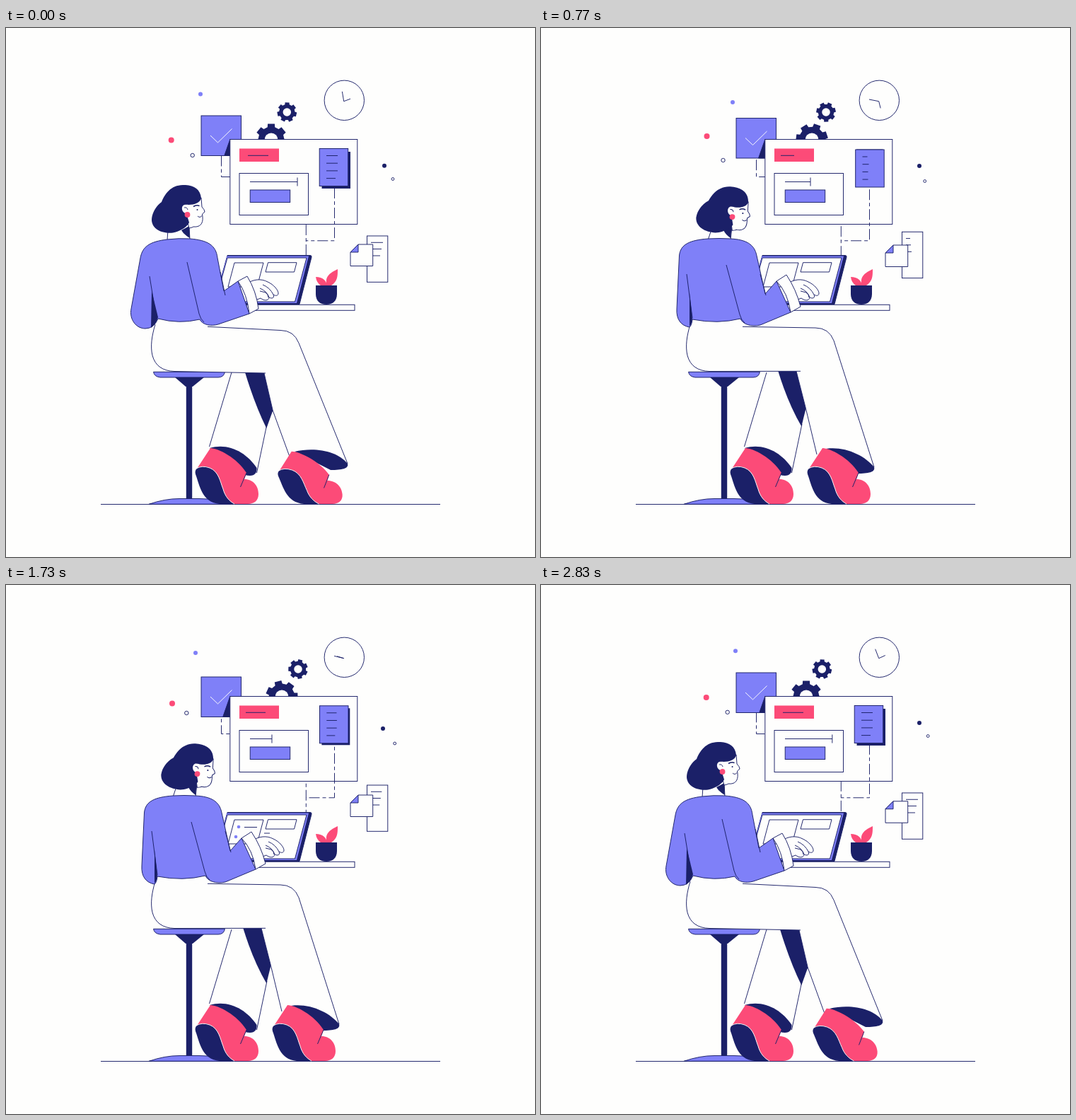
These frames come from a looping animation (748x748 px, 2860 ms). An HTML page:

```html
<!DOCTYPE html>
<html>
<head>
<meta charset="utf-8">
<style>
  html, body { margin: 0; width: 100%; height: 100%; overflow: hidden; background: #fefefd; }
  svg { display: block; width: 100vw; height: 100vh; stroke-width: .95; }
</style>
</head>
<body>
<svg id="stage" viewBox="0 0 748 748"></svg>
<script>
const LOOP = 2860;
const TIMES = [0, 370, 770, 1370, 1730, 2130];
const NAVY = '#1b2068', BLUE = '#7f80f8', PINK = '#fc4b78', WHITE = '#fefefd';
const stage = document.getElementById('stage');

// Smooth cyclic interpolation through one value per key time, without overshoot
function key(t, v) {
  const n = TIMES.length;
  const at = i => TIMES[(i + n) % n] + LOOP * Math.floor(i / n);
  const val = i => v[(i + n) % n];
  const slope = i => (val(i + 1) - val(i)) / (at(i + 1) - at(i));
  const tangent = i => {
    const a = slope(i - 1), b = slope(i);
    return a * b > 0 ? 2 * a * b / (a + b) : 0;
  };
  let i = n - 1;
  while (at(i) > t) i--;
  const d = at(i + 1) - at(i), u = (t - at(i)) / d, w = 1 - u;
  return val(i) * w * w * (1 + 2 * u) + val(i + 1) * u * u * (3 - 2 * u)
    + d * u * w * (tangent(i) * w - tangent(i + 1) * u);
}

function ramp(t, a, b) {
  const u = Math.min(1, Math.max(0, (t - a) / (b - a)));
  return u * u * (3 - 2 * u);
}

// Blends two path strings that share the same structure
function morph(a, b, u) {
  const nums = b.match(/[\d.]+/g);
  let i = 0;
  return a.replace(/[\d.]+/g, n => (+n + (nums[i++] - n) * u).toFixed(2));
}

const path = (d, fill = 'none', stroke = NAVY, extra = '') =>
  `<path d="${d}" fill="${fill}" stroke="${stroke}" ${extra}/>`;
const rect = (x, y, w, h, fill = WHITE, stroke = NAVY) =>
  `<rect x="${x}" y="${y}" width="${w}" height="${h}" fill="${fill}" stroke="${stroke}"/>`;
const circle = (x, y, r, fill = WHITE, stroke = 'none') =>
  `<circle cx="${x}" cy="${y}" r="${r}" fill="${fill}" stroke="${stroke}"/>`;
const group = (transform, body) => `<g transform="${transform}">${body}</g>`;
const hline = (x, y, w) => w > 0.3 ? `M${x} ${y}h${w}` : '';

function gear(x, y, r, turn) {
  const teeth = 7, pts = [];
  for (let i = 0; i < teeth; i++) {
    for (const [o, k] of [[-.32, .8], [-.24, 1], [.24, 1], [.32, .8]]) {
      const a = (i + o) / teeth * 2 * Math.PI + turn;
      pts.push((x + r * k * Math.sin(a)).toFixed(2) + ' ' + (y - r * k * Math.cos(a)).toFixed(2));
    }
  }
  return path('M' + pts.join('L') + 'Z', NAVY, 'none') + circle(x, y, r * .41);
}

function clock(t) {
  const hand = (deg, len) => {
    const a = deg * Math.PI / 180;
    return `M477.7 103.7L${477.7 + len * Math.sin(a)} ${103.7 - len * Math.cos(a)}`;
  };
  const turn = t / LOOP * 360;
  return circle(478.3, 102.3, 28.2, WHITE, NAVY) + path(hand(turn * 3 - 10, 14) + hand(turn + 69, 10));
}

function dots(t) {
  return circle(key(t, [275, 273, 271, 268, 268, 270]), key(t, [93.5, 100, 105, 102, 96, 91]), 3, BLUE)
    + circle(key(t, [233.7, 233.7, 234.5, 235.7, 235, 232.5]), key(t, [158.5, 153, 153, 162, 167.5, 168.5]), 4, PINK)
    + circle(key(t, [263.7, 261, 257.5, 254.7, 255.3, 258]), key(t, [180, 184, 187, 184, 181, 177.7]), 2.7, WHITE, NAVY)
    + circle(key(t, [535, 534.7, 535, 534, 533, 533]), key(t, [194.7, 193.3, 195, 201, 203, 203]), 3, NAVY)
    + circle(key(t, [547, 544, 542.7, 546.3, 549.7, 550.5]), key(t, [213.5, 213.7, 216.5, 222, 224, 222]), 1.9, WHITE, NAVY);
}

function board(t) {
  const flow = `stroke-dasharray="15 4 5 4" stroke-dashoffset="${-t / LOOP * 112}"`;
  const y = key(t, [124, 125, 127.5, 131, 130, 127.5]), low = y + 56.5;
  const tick = 1 - ramp(t, 950, 1250) + ramp(t, 1420, 1700);
  const small = key(t, [397.3, 398.3, 403, 412, 413, 408]);
  const big = key(t, [375, 378, 383, 391, 390, 383]);
  const s = key(t, [1, .65, 0, 1, .8, 0]), shift = 1.5 * (1 - s);
  const slider = key(t, [412, 378, 381, 385, 376, 369]);
  const from = key(t, [342, 341, 339, 343, 339, 338]), to = key(t, [371, 368, 358, 372, 367, 366]);
  const rows = [7, 9, 8, 8].map((w, i) =>
    hline(453 + shift, 180.5 + shift + i * 10.7, w + s * [9, 7, 8, 5][i])).join('');

  return path(`M304.5 ${low}V210.5H317`, 'none', NAVY, flow)
    + rect(276, y, 56.5, 56.5, BLUE)
    + path(`M317 157L${317 - (low - 157) * .35} ${low}H317Z`, NAVY)
    + (tick > .01 ? path(`M289 ${y + 28}l10.5 10 20-19.5`, 'none', WHITE,
        `pathLength="1" stroke-dasharray="${tick} 2"`) : '')
    + gear(small, 119, 14, (small - 397) / 14)
    + gear(big, 158, 23, (big - 375) / 23)
    + rect(316.8, 157.5, 180, 120)
    + rect(330, 170.5, 56, 18.5, PINK, 'none') + path(hline(from, 180.3, to - from))
    + rect(330, 205.5, 97.5, 59)
    + rect(345.2, 229, 56.5, 17.5, BLUE)
    + path(`M345 217.5H${slider}M${slider} 211.5v12`)
    + rect(446 + .5 * s, 171.5 + 3.5 * s, 37.5 + 3 * s, 52, NAVY, 'none')
    + rect(443.2 + shift, 170.5 + shift, 40.5, 53, BLUE) + path(rows)
    + path('M464.5 226V300.8H424M424.3 278V321', 'none', NAVY, flow);
}

function papers(t) {
  const y = key(t, [294, 292.3, 288.3, 282.7, 283, 287]);
  const top = key(t, [306, 308, 307, 300, 297, 297]);
  const s = key(t, [1, .75, 0, 1, .85, .45]);
  return rect(510.5, y, 29.3, 65.3)
    + path(hline(516, y + 9.3, 6 + 11 * s) + hline(516, y + 18.5, 7 + 8 * s) + hline(516, y + 28, 8 + 5 * s))
    + path(`M498 ${top}H518.7v30.5H487v-19.5Z`, WHITE)
    + path(`M498 ${top}v11H487Z`, BLUE);
}

function desk(t) {
  const gone = 1 - ramp(t, 2350, 2600);
  const list = ramp(t, 850, 1200) * gone, note = ramp(t, 1550, 2050) * gone;
  return rect(340, 391.3, 153, 8)
    + path('M313 321.5H430Q432.5 321.5 432 324L415 390.5H294Z', NAVY)
    + path('M312.5 322.5H428L411 389H294Z', BLUE, 'none')
    + path('M313 325H425L408.5 387H296Z', WHITE, NAVY)
    + path('M323 332H364L355 366H314ZM370.5 331.7H411L407.5 345H367Z')
    + circle(329, 342, 2.3 * list, BLUE) + circle(325, 356, 2.3 * list, BLUE)
    + path(hline(337, 342.5, 18 * list) + hline(365, 351, 27 * note))
    + path('M454 364C450 352 458 346 469 341C469 351 469 358 460 364Z'
      + 'M438 352C448 352 453 357 454 364H445Q439 360 438 352Z', PINK, 'none')
    + path('M438 364H468V376C468 386 462 391 453 391S438 386 438 376Z', NAVY, 'none');
}

const STOOL = path('M254.8 500H263.2V667H254.8Z', NAVY, 'none')
  + path('M239 494H280L264 507H254Z', NAVY, 'none')
  + path('M202 673.3Q225 665.5 245 665.5H273Q297 665.5 318 673.3Z', BLUE)
  + path('M208.5 486.3H309.5Q308 494 300 494H218Q209.5 493 208.5 486.3Z', BLUE);

const SHOE = path('M289 594C300 594 327 608 340 629L337 638C350 638 357 648 357 659C357 668 351 673 342 673H310'
    + 'L270 628V623Z', PINK, 'none')
  + path('M340 629L331.5 649')
  + path('M268 631C265 620 280 618 288 622C301 627 303 642 307 652C310 663 316 669 323 673H302'
    + 'C277 671 274 647 268 631Z', NAVY, 'none')
  + path('M269 623Q277 618 288 622C301 627 303 642 307 652C310 663 316 669 323 673', 'none', WHITE);

function legs(t) {
  const knee = key(t, [427.5, 420.5, 424, 424, 424, 422]);
  const under = key(t, [488, 482.3, 485.3, 485.3, 485.3, 484]);
  const hx = key(t, [483, 478.5, 471, 471, 471, 475.5]);
  const hy = key(t, [616, 614, 621, 621, 621, 616]);
  const bx = key(t, [401, 397, 390, 390, 390, 394]);
  const by = key(t, [606, 600, 603, 603, 603, 601]);
  const dx = key(t, [119.5, 118.5, 109, 109, 109, 113.5]);
  const tilt = key(t, [0, -5, 0, 0, 0, -2.3]);
  const lean = key(t, [.06, 0, 0, 0, 0, 0]);
  const crotch = key(t, [338, 338, 335, 335, 335, 337]);
  const swing = (bx - 390) * .36;
  const inner = `L${361 + swing} ${under}L${374.5 + swing * .7} ${under + 53}L${bx} ${by}`;
  const hip = 'M211 419C206 436 204 450 207 463C211 478 222 485 238 485.5';
  const front = `L388 ${knee}Q407 ${knee} 414 ${knee + 18}L${hx} ${hy}`;

  return path('M319 487L287.5 592M369 560L354.5 629')
    + path(`M${crotch} ${under - 1}H${361 + swing}L${374.5 + swing * .7} ${under + 53}L${368.3} ${under + 78}`
      + `Q${crotch + 14} ${under + 45} ${crotch} ${under - 1}Z`, NAVY, 'none')
    + path('M288 594C314 586 340 600 354.5 622C355 631 350 635 338 632Z', NAVY, 'none') + SHOE
    + path(`${hip}${inner}L${hx} ${hy}L414 ${knee + 18}Q407 ${knee} 388 ${knee}L285 422`, WHITE, 'none')
    + path(`${hip}L367 ${under}M${361 + swing} ${under}${inner}M285 422.3${front}`)
    + path(`M${bx + 7} ${by - 7}C${bx + 35} ${by - 14} ${hx - 14} ${hy - 18} ${hx} ${hy}`
      + `C${hx + 2} ${hy + 7} ${hx - 8} ${hy + 9} ${hx - 24} ${hy + 9}Z`, NAVY, 'none')
    + group(`translate(${dx} 0) rotate(${tilt} 285 672) matrix(1 0 ${lean} ${1 - lean} ${-673 * lean} ${673 * lean})`, SHOE);
}

function head(h) {
  const skull = path('M250 250L259 283Q264 282 265 281C274 282 279 277 278 267L277.5 263L281 260Q281 257 277 253L276 240Z', WHITE)
    + path('M276 241C275 227 264 221.5 250 222C233 222.5 225 234 220 246C213 251 206 261 206 272C207 285 221 291 236 289.5'
      + 'C248 287 256 281 259 275L255 262L250 255C251 250 255 249 258 250C267 250 274 247 276 241Z', NAVY, 'none')
    + path('M259 262C250 265 246 254 251 250.5C256 248 261 253 259 262Z', WHITE, 'none')
    + path('M252 254Q256 253 257 257')
    + path('M265 252.5Q269 249.5 273.5 251.5', 'none', NAVY, 'stroke-width="1.6"')
    + path('M271 266Q274 269 277 265.5')
    + circle(270.5, 257, 1, NAVY) + circle(256.5, 264, 3.9, PINK);
  return path(`M${229 + 12 * h} 285L${228 + 8 * h} 300H${260 + 8 * h}L${259 + 11 * h} 280`, WHITE)
    + path(`M${248 + 10 * h} 286L${259 + 11 * h} 280L${260 + 8 * h} 297Q${251 + 10 * h} 292 ${248 + 10 * h} 286Z`, NAVY, 'none')
    + group(`translate(${14 * h} ${3 * h}) rotate(${8 * h} 256 264)`, skull);
}

function upper(t) {
  const h = key(t, [0, 1, 1, 1.18, 1, .72]);
  const g = key(t, [0, 1, 1, 1.05, 1, .9]);
  const p = key(t, [0, 1, 1, 1, 1, 1]);
  const hand = path('M340 362C349 355 361 354 370 359C379 363 385 371 385 375C385 379 381 379 378 377'
      + 'C380 382 376 383 372 381C371 386 365 386 360 382L350 386Z', WHITE)
    + path('M363 363Q373 367 378 377M359 368Q369 372 372 381M359 372L367 374Q371 377 371 381');
  const body = morph(
    'M190 325C193 309 203 302 228 299Q244 297 260 298C285 300 297 307 299 325L308 372L328 358L344 404L300 419C290 422 278 420 274 412Q245 419 215 411Q209 425 197 425C184 425 174 412 177 397Z',
    'M195.5 322C197 306 210 300 236 298Q252 297 268 298C290 299 302 306 305 322L317 376L333 358L353 402L310 420C298 423 285 419 282 411Q250 419 214 412Q213 421 210 423C198 421 191 412 192 397Z', g);
  const folds = morph(
    'M256 331L273 404Q275 412 280 416M303 345L310 378M203 351L210 394',
    'M262 335L281 405Q283 413 288 417M310 348L318 378M206 348L214 410', g);
  const shade = morph('M206 372L215 409Q212 419 205 424Z', 'M210 375L214 411Q213 419 210 422Z', g);
  const cuff = morph('M328 358L341 351Q354 372 357 397L344 404Q341 376 328 358Z',
    'M333 358L347 349Q361 370 367 394L353 402Q349 374 333 358Z', p);
  return head(h) + group(`translate(${8 * p} 0)`, hand)
    + path(body, BLUE) + path(shade, NAVY, 'none') + path(folds) + path(cuff, WHITE);
}

function draw() {
  const t = performance.now() % LOOP;
  stage.innerHTML = dots(t) + clock(t) + board(t) + papers(t) + desk(t)
    + path('M134 673.5H614') + STOOL + legs(t) + upper(t);
  requestAnimationFrame(draw);
}
draw();
</script>
</body>
</html>
```
